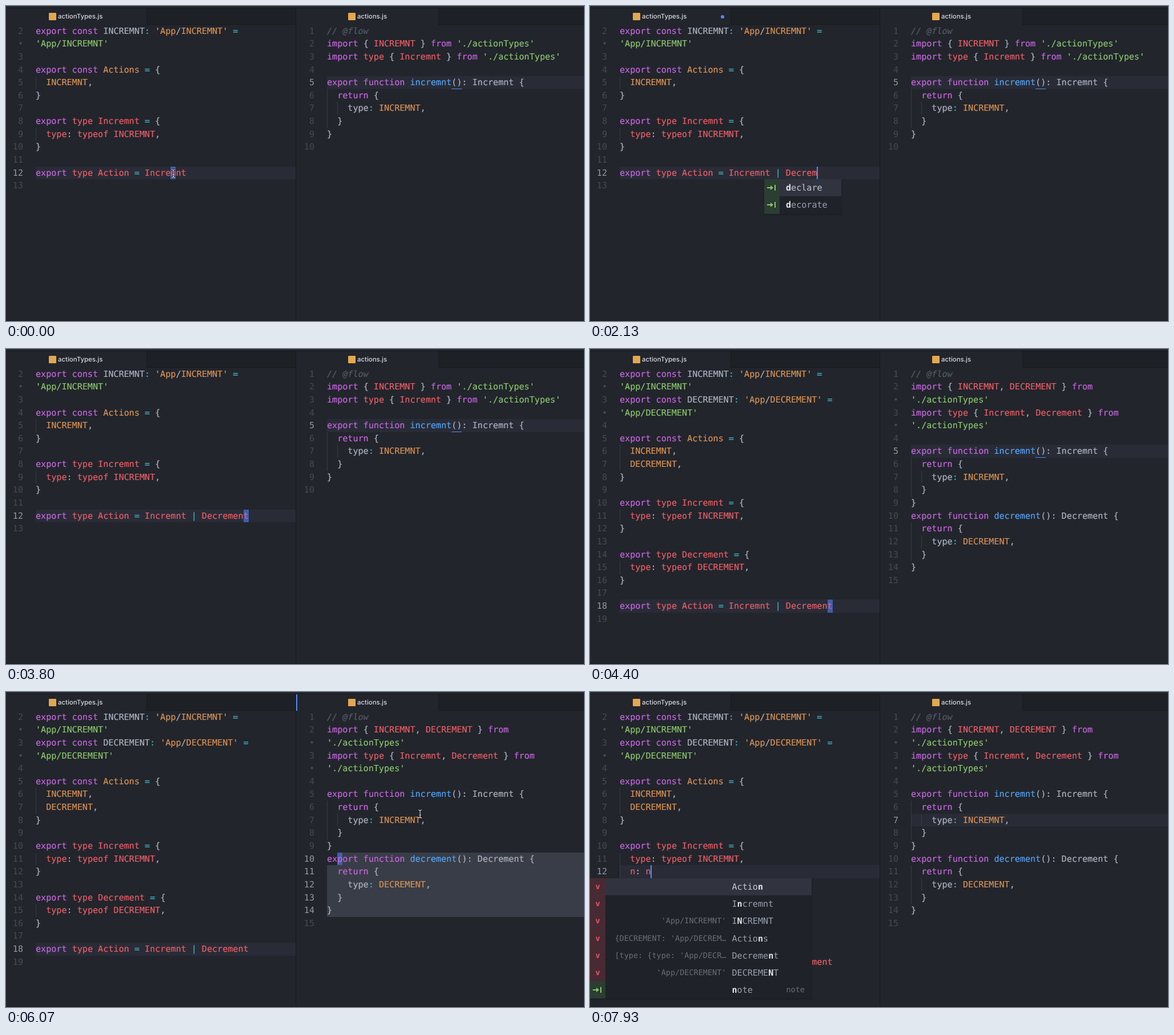
Recreate the animation shown at these times as an HTML page. Size 1012 by 553 pixels, loop 8000 ms.

```html
<!DOCTYPE html>
<html lang="en">
<head>
<meta charset="utf-8">
<title>Editor</title>
<style>
html, body { margin: 0; width: 100%; height: 100%; overflow: hidden; background: #22252c; }
#stage {
  position: relative; width: 1012px; height: 553px; overflow: hidden; background: #22252c;
  font: 15.1px/22.64px "DejaVu Sans Mono", "Liberation Mono", monospace;
  color: #abb2bf; text-rendering: geometricPrecision;
}
#stage div, #stage i, #stage svg { position: absolute; }
.bar { top: 4px; height: 28px; background: #1d2025; border-bottom: 1px solid #17191d; box-sizing: content-box; }
.tab { top: 0; left: 0; height: 29px; background: #22252c; border-right: 1px solid #17191d; }
.tab b { position: absolute; top: 8px; width: 12.5px; height: 12.5px; border-radius: 1px; background: #e3a84f; }
.tab span {
  position: absolute; top: 0; line-height: 29px; white-space: pre; color: #d7dae0;
  font-family: Inter, "Open Sans", sans-serif; font-size: 11.4px; font-weight: 500;
}
#dot { left: 229px; top: 15.5px; width: 6px; height: 6px; border-radius: 50%; background: #568af2; }
#focus { left: 508px; top: 4px; width: 2px; height: 29px; background: #568af2; }
.pane { top: 0; height: 553px; overflow: hidden; }
.line { white-space: pre; height: 22.64px; -webkit-text-stroke: .2px; }
.num { width: 40px; text-align: right; color: #454a54; height: 22.64px; }
.num.on { color: #9299a5; }
.row { height: 22.7px; background: #292c37; }
.sel { height: 22.7px; background: #393d47; }
.block { width: 9.1px; height: 22.7px; background: #3e5eb0; }
.beam { width: 2px; height: 22.7px; background: #528bff; }
.match { width: 18.2px; height: 1.4px; background: #568af2; }
.guide { width: 1px; height: 22.7px; background: #373b44; }
.p { color: #c666de } .r { color: #ea5d65 } .o { color: #d99152 } .g { color: #8ac46c }
.c { color: #3fb4c6 } .b { color: #55a3f2 } .w { color: #abb2bf }
.m { color: #565c68; font-style: italic }
.menu { background: #1f2228; box-shadow: 0 1px 2px #17191d; color: #9aa1ae; }
.item { left: 0; width: 100%; height: 30.2px; line-height: 30.2px; white-space: pre; }
.item.top { background: #31343e; color: #c4c8d0; }
.item div { top: 0; }
.item b { color: #e6e8ec; }
.item .icon { left: 0; width: 27px; height: 30.2px; background: #472a33; color: #e8555f; text-align: center; font-size: 13.5px; font-weight: bold; }
.item .icon.snip { background: #2c3d33; color: #8ac46c; }
.item .hint { color: #696e78; font-size: 13.5px; }
.icon svg { left: 4px; top: 9px; }
</style>
</head>
<body>
<div id="stage">
  <div style="left:0;top:0;width:1012px;height:3px;background:#25282e"></div>
  <div style="left:0;top:3px;width:1012px;height:1px;background:#17191d"></div>
  <div class="bar" style="left:0;width:507px">
    <div class="tab" style="width:246px"><b style="left:75px"></b><span style="left:91px">actionTypes.js</span></div>
  </div>
  <div class="bar" style="left:508px;width:504px">
    <div class="tab" style="width:249px"><b style="left:91px"></b><span style="left:107px">actions.js</span></div>
  </div>
  <div id="dot"></div>
  <div class="pane" id="left" style="left:0;width:507px"></div>
  <div class="pane" id="right" style="left:508px;width:504px"></div>
  <div style="left:507px;top:4px;width:1px;height:549px;background:#17191d"></div>
  <div style="left:0;top:552px;width:1012px;height:1px;background:#17191d"></div>
  <div id="focus"></div>
  <div id="menu"></div>
  <svg id="mouse" width="12" height="18" viewBox="-6 -9 12 18" style="left:-6px;top:-9px" fill="none">
    <path id="ibeam" d="M-3-7Q0-7 0-5Q0-7 3-7M0-5V5M-3 7Q0 7 0 5Q0 7 3 7M-1.5 2H1.5" stroke="#15171b" stroke-width="2.6"/>
    <use href="#ibeam"/>
    <path d="M-3-7Q0-7 0-5Q0-7 3-7M0-5V5M-3 7Q0 7 0 5Q0 7 3 7M-1.5 2H1.5" stroke="#e4e6ea" stroke-width="1.1"/>
  </svg>
</div>
<script>
const LOOP = 8000, TOP = 32.6, ROW = 22.64, COL = 9.09;
const $ = id => document.getElementById(id);
const count = (times, t) => times.filter(k => t >= k).length;
const rowTop = r => TOP + r * ROW;

// Moments of the session
const APPEND = 670, ESCAPE = 2870, SAVE = 3730, EXPAND = 3930;
const PRESS = 5400, RELEASE = 5870, CLICK = 6200, BACK = 6630, OPEN = 7070;
const TAIL = [870, 1070, 1200, 1470, 1600, 1730, 1870, 2000, 2130, 2270, 2400, 2530];
const FIELD = [7530, 7660, 7730, 7800];
const PATH = [[5000, 293, 294], [PRESS, 600, 406], [RELEASE, 585, 293],
  [6070, 725, 214], [6270, 725, 214], [BACK, 265, 293]];

// "~x" switches to colour class x; a leading "^" marks a wrapped line
const paint = s => s.split('~').map((part, i) =>
  i ? `<span class="${part[0]}">${part.slice(1)}</span>` : part).join('');

const box = (cls, x, y, extra = '') => `<i class="${cls}" style="left:${x}px;top:${y}px;${extra}"></i>`;

function pane(lines, first, x0, view) {
  let back = '', text = '', num = first;
  const at = col => x0 + col * COL;
  const { row, on = [], sel, block, beam, match } = view;
  if (row != null) back += box('row', x0, rowTop(row), 'right:0');
  if (sel) for (let r = sel.from; r <= sel.to; r++) {
    back += box('sel', at(r === sel.from ? sel.col : 0), rowTop(r), 'right:0');
  }
  if (block) back += box('block', at(block[1]), rowTop(block[0]));
  lines.forEach((line, r) => {
    const y = rowTop(r), wrapped = line[0] === '^';
    const code = wrapped ? line.slice(1) : line;
    const indent = code.match(/^ */)[0].length;
    for (let c = 0; c < indent; c += 2) back += box('guide', at(c), y);
    const lit = r === row || on.includes(r) ? ' on' : '';
    text += `<div class="num${lit}" style="left:${x0 - 62}px;top:${y}px">${wrapped ? '•' : num++}</div>`;
    text += `<div class="line" style="left:${x0}px;top:${y}px">${paint(code)}</div>`;
  });
  if (match) text += box('match', at(match[1]), rowTop(match[0]) + 21.6);
  if (beam) text += box('beam', at(beam[1]) - .5, rowTop(beam[0]));
  return back + text;
}

const constant = n => [`~pexport const ~w${n}~c: ~o'App~w/~o${n}' ~c=`, `^~g'App/${n}'`];
const shape = (n, extra = []) => [
  `~pexport ~rtype ${n} ~c= ~w{`, `  ~rtype~w: ~rtypeof ${n.toUpperCase()}~w,`, ...extra, '~w}', ''];
const creator = n => {
  const type = n[0].toUpperCase() + n.slice(1);
  return [`~pexport function ~b${n}~w(): ${type} {`, '  ~preturn ~w{',
    `    ~wtype~c: ~o${n.toUpperCase()}~w,`, '  ~w}', '~w}'];
};

function leftLines(t) {
  const big = t >= EXPAND;
  const tail = ' | Decrement'.slice(0, count(TAIL, t)).replace('|', '~c|~r');
  const typed = 'n: n'.slice(0, count(FIELD, t)).replace(':', '~w:~r');
  return [
    ...constant('INCREMNT'), ...(big ? constant('DECREMENT') : []), '',
    '~pexport const ~oActions ~c= ~w{', '  ~oINCREMNT~w,',
    ...(big ? ['  ~oDECREMENT~w,'] : []), '~w}', '',
    ...shape('Incremnt', t >= OPEN ? ['  ~r' + typed] : []),
    ...(big ? shape('Decrement') : []),
    '~pexport ~rtype Action ~c= ~rIncremnt' + tail, ''
  ];
}

function leftView(t) {
  const last = t >= EXPAND ? 18 : 11;
  if (t < APPEND) return { row: 11, block: [11, 26] };
  if (t < ESCAPE) return { row: 11, beam: [11, 29 + count(TAIL, t)] };
  if (t < PRESS) return { row: last, block: [last, 40] };
  if (t < BACK) return { row: last };
  if (t < OPEN) return { row: 11, block: [11, 23] };
  return { row: 12, beam: [12, 2 + count(FIELD, t)] };
}

function rightLines(t) {
  const load = (head, names, wrap) => {
    const start = `~pimport ${head}~w{ ~r${names.join('~w, ~r')} ~w} ~pfrom`;
    const path = "~g'./actionTypes'";
    return wrap ? [start, '^' + path] : [start + ' ' + path];
  };
  const big = t >= EXPAND;
  const pick = (a, b) => big ? [a, b] : [a];
  return [
    '~m// @flow',
    ...load('', pick('INCREMNT', 'DECREMENT'), big),
    ...load('~rtype ', pick('Incremnt', 'Decrement'), big), '',
    ...creator('incremnt'), ...(big ? creator('decrement') : []), ''
  ];
}

function rightView(t) {
  if (t < PRESS) {
    const row = t >= EXPAND ? 6 : 4;
    return { row, match: [row, 24] };
  }
  if (t >= CLICK) return { row: 7 + 1, block: t < BACK ? [8, 18] : null };
  const y = mouseAt(Math.min(t, RELEASE))[1];
  const head = Math.floor((y - TOP) / ROW);
  if (head >= 16) return { row: 16, block: [16, 0] };
  const col = head === 15 ? 1 : 2;
  const on = [11, 12, 13, 14, 15].filter(r => r >= head);
  return { on, sel: { from: head, to: 15, col }, block: [head, col] };
}

function mouseAt(t) {
  if (t < APPEND) return [293, 294];
  if (t < PATH[0][0] || t >= OPEN) return null;
  const i = PATH.findIndex(k => k[0] > t);
  if (i < 0) return PATH[PATH.length - 1].slice(1);
  const [t0, x0, y0] = PATH[i - 1], [t1, x1, y1] = PATH[i];
  const u = (t - t0) / (t1 - t0), e = u * u * (3 - 2 * u);
  return [x0 + (x1 - x0) * e, y0 + (y1 - y0) * e];
}

const ARROW = '<svg width="18" height="12" fill="none" stroke="#8ac46c" stroke-width="2">' +
  '<path d="M1 6H9M15 1V11"/><path d="M7 2L12 6L7 10Z" fill="#8ac46c" stroke="none"/></svg>';

// Each item: word with the matched letter in [ ], text before it, text after it
function menu(x, y, width, wordX, items) {
  const rows = items.map(([word, before = '', after = ''], i) => {
    const snip = before === null || after;
    return `<div class="item${i ? '' : ' top'}" style="top:${i * 30.2}px">` +
      `<div class="icon${snip ? ' snip' : ''}">${snip ? ARROW : 'v'}</div>` +
      `<div class="hint" style="right:${width - wordX + 10}px">${before || ''}</div>` +
      `<div style="left:${wordX}px">${word.replace('[', '<b>').replace(']', '</b>')}</div>` +
      `<div class="hint" style="right:12px">${after}</div></div>`;
  });
  return `<div class="menu" style="left:${x}px;top:${y}px;width:${width}px;height:${items.length * 30.2}px">${rows.join('')}</div>`;
}

function menuAt(t) {
  if (t >= 1600 && t < 2730) {
    return menu(305, 304.3, 135, 38, [['[d]eclare', null], ['[d]ecorate', null]]);
  }
  if (t < 7865) return '';
  return menu(0, 327, 388, 248.5, [
    ['Actio[n]'], ['I[n]cremnt'], ['I[N]CREMNT', "'App/INCREMNT'"],
    ['Actio[n]s', "{DECREMENT: 'App/DECREM…"], ['Decreme[n]t', "[type: {type: 'App/DECR…"],
    ['DECREME[N]T', "'App/DECREMENT'"], ['[n]ote', '', 'note']
  ]);
}

const shown = {};
function put(id, html) {
  if (shown[id] !== html) $(id).innerHTML = shown[id] = html;
}
const show = (id, on) => { $(id).style.display = on ? 'block' : 'none'; };

function draw(now) {
  const t = now % LOOP;
  put('left', pane(leftLines(t), 2, 52, leftView(t)));
  put('right', pane(rightLines(t), 1, 54, rightView(t)));
  put('menu', menuAt(t));
  show('dot', t >= TAIL[0] && t < SAVE);
  show('focus', t >= PRESS && t < BACK);
  const spot = mouseAt(t);
  show('mouse', spot);
  if (spot) $('mouse').style.transform = `translate(${spot[0]}px, ${spot[1]}px)`;
}

const start = performance.now();
function tick() {
  draw(performance.now() - start);
  requestAnimationFrame(tick);
}
tick();
</script>
</body>
</html>
```
